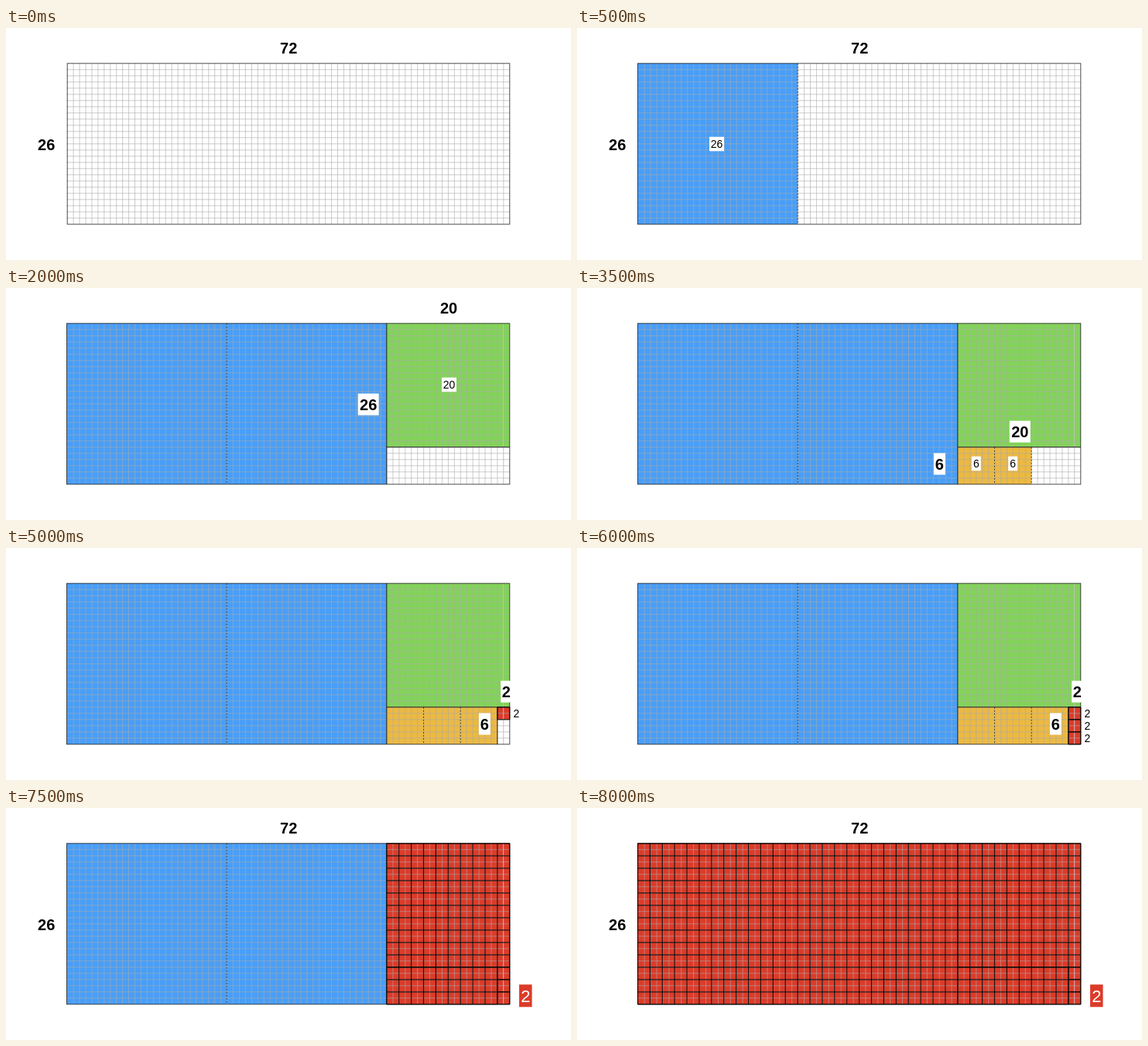
Animation, 730 px wide and 300 px high, one loop 8500 ms. Source, as an HTML page:

```html
<!DOCTYPE html>
<html lang="en">
<head>
<meta charset="utf-8">
<title>Euclidean tiling of 72 by 26</title>
<style>
  html, body { margin: 0; width: 100%; height: 100%; overflow: hidden; background: #fff; }
  svg { display: block; width: 730px; height: 300px; }
  text { font-family: "Liberation Sans", Arial, sans-serif; text-anchor: middle; }
</style>
</head>
<body>
<svg id="stage" viewBox="0 0 730 300"></svg>
<script>
const STEP = 500, STEPS = 17;
const COLS = 72, ROWS = 26;
const X0 = 78.5, X1 = 650.8, Y0 = 45.8, CELL = 8;
const BLUE = '#489ef8', GREEN = '#83d359', ORANGE = '#ecb942', RED = '#dc3b29';
const stage = document.getElementById('stage');
const timed = [];

const px = c => X0 + c * (X1 - X0) / COLS;
const py = r => Y0 + r * CELL;

function add(tag, attrs, parent = stage) {
  const el = document.createElementNS('http://www.w3.org/2000/svg', tag);
  for (const k in attrs) el.setAttribute(k, attrs[k]);
  parent.appendChild(el);
  return el;
}

// Group visible from step a up to, but not including, step b.
function during(a, b, parent = stage) {
  const el = add('g', {}, parent);
  timed.push({ el, a, b });
  return el;
}

const fills = add('g', {});
const grid = add('g', { stroke: '#aaa', 'stroke-opacity': 0.6, 'stroke-width': 1 });
const edges = add('g', { fill: 'none', stroke: '#000' });
const labels = add('g', {});

function fill(a, c, r, w, h, color) {
  add('rect', { x: px(c), y: py(r), width: px(c + w) - px(c), height: h * CELL, fill: color },
    during(a, STEPS, fills));
}

function line(x1, y1, x2, y2, parent, extra = {}) {
  add('line', { x1, y1, x2, y2, ...extra }, parent);
}

function edge(a, b, c1, r1, c2, r2, dashed) {
  line(px(c1), py(r1), px(c2), py(r2), during(a, b, edges),
    dashed ? { 'stroke-dasharray': '2 2', 'stroke-opacity': 0.65 } : { 'stroke-opacity': 0.85 });
}

// Red area ruled into 2 by 2 squares.
function redArea(a, c, r, w, h) {
  fill(a, c, r, w, h, RED);
  const g = add('g', { 'stroke-width': 1.2, 'stroke-opacity': 0.85 }, during(a, STEPS, edges));
  for (let i = c; i <= c + w; i += 2) line(px(i), py(r), px(i), py(r + h), g);
  for (let j = r; j <= r + h; j += 2) line(px(c), py(j), px(c + w), py(j), g);
}

function label(a, b, text, x, y, size, box, weight = 400, ink = '#000', back = '#fff') {
  const g = during(a, b, labels);
  if (box) add('rect', { x: x - box[0] / 2, y: y - box[1] / 2, width: box[0], height: box[1], fill: back }, g);
  add('text', { x, y: y + size * 0.36, 'font-size': size, 'font-weight': weight, fill: ink }, g).textContent = text;
}
const side = (a, b, text, x, y, w) => label(a, b, text, x, y, 20, w && [w, 28], 700);
const tag = (a, b, text, x, y) => label(a, b, text, x, y, 14, [text.length > 1 ? 19 : 12, 18.5]);

// Squares
fill(1, 0, 0, 26, 26, BLUE);
fill(2, 26, 0, 26, 26, BLUE);
fill(4, 52, 0, 20, 20, GREEN);
for (let i = 0; i < 3; i++) fill(6 + i, 52 + 6 * i, 20, 6, 6, ORANGE);

// Unit grid
const left = 79.2, unit = (X1 - left) / COLS;
for (let i = 1; i < COLS; i++) line(left + i * unit, Y0, left + i * unit, py(ROWS), grid);
for (let j = 1; j < ROWS; j++) line(X0, py(j), X1, py(j), grid);
line(642.5, Y0, 642.5, py(ROWS), during(4, STEPS, grid), { stroke: '#ccc' });

// Outlines
const frame = (x, a, b) => add('rect',
  { x, y: Y0, width: X1 - x, height: ROWS * CELL, 'stroke-opacity': 0.7 }, during(a, b, edges));
frame(left, 0, 1);
frame(X0, 1, STEPS);
edge(1, 16, 26, 0, 26, 26, true);
edge(2, 16, 52, 0, 52, 26);
edge(4, 15, 52, 20, 72, 20);
edge(6, 14, 58, 20, 58, 26, true);
edge(7, 14, 64, 20, 64, 26, true);
edge(8, 14, 70, 20, 70, 26);

// Red squares, then the whole area in reverse
for (let i = 0; i < 3; i++) redArea(10 + i, 70, 20 + 2 * i, 2, 2);
redArea(14, 52, 20, 18, 6);
redArea(15, 52, 0, 20, 20);
redArea(16, 0, 0, 52, 26);

// Side lengths
for (const [a, b] of [[0, 3], [13, STEPS]]) {
  side(a, b, '72', 365.2, 26);
  side(a, b, '26', 52.2, 151);
}
side(3, 5, '20', 572, 26);
side(3, 5, '26', 468.2, 150.5, 27);
side(5, 9, '20', 572.3, 185.7, 27);
side(5, 9, '6', 468.4, 227.5, 15);
side(9, 13, '2', 646.2, 185.7, 14);
side(9, 13, '6', 618.4, 227.5, 15);

// Square sizes
tag(1, 3, '26', 180.5, 150);
tag(2, 3, '26', 390.5, 150);
tag(4, 5, '20', 572.5, 125);
for (let i = 0; i < 3; i++) {
  tag(6 + i, 9, '6', 515.8 + 47.3 * i, 227);
  tag(10 + i, 13, '2', 659.5, 214 + 16 * i);
}
label(13, STEPS, '2', 671.3, 242.8, 22, [16.5, 29], 400, '#fff', RED);

function draw(ms) {
  const n = Math.floor(ms / STEP) % STEPS;
  for (const { el, a, b } of timed) el.setAttribute('display', n >= a && n < b ? 'inline' : 'none');
}

const start = performance.now();
function tick() {
  draw(performance.now() - start);
  requestAnimationFrame(tick);
}
tick();
</script>
</body>
</html>
```
